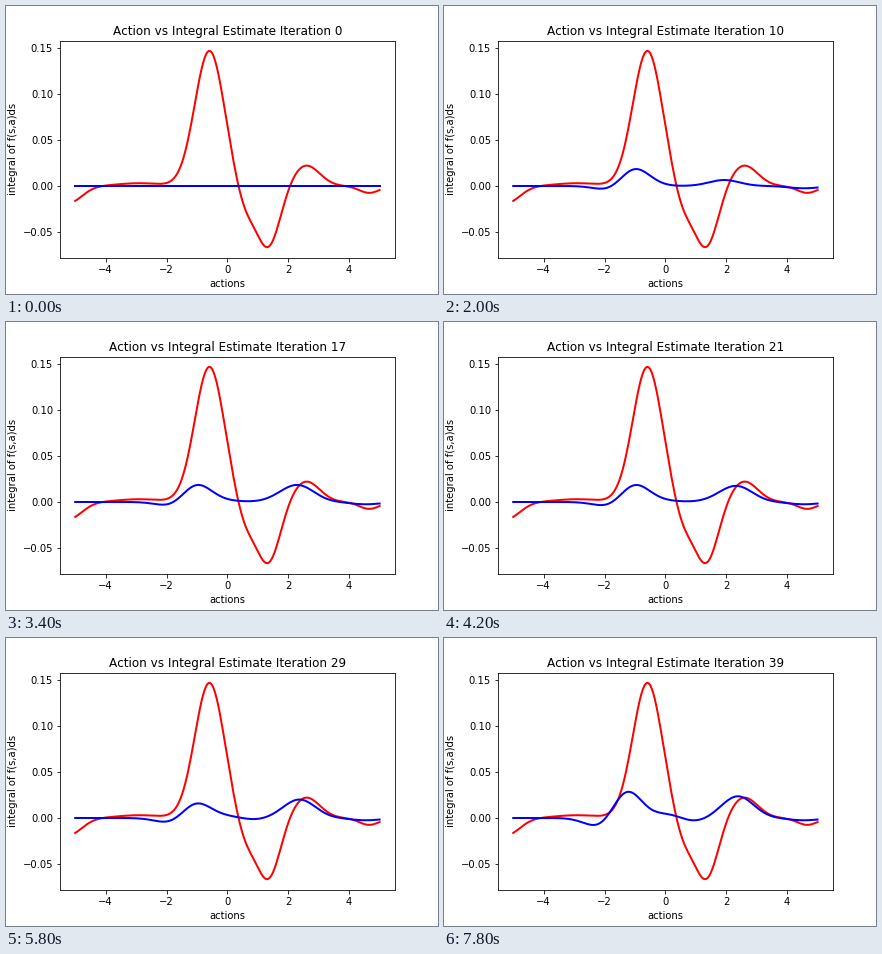
Animation, 432 px wide and 288 px high, one loop 8000 ms. Source, as a matplotlib script:

```python
import numpy as np
import matplotlib.pyplot as plt
from matplotlib.animation import FuncAnimation

FRAMES = 40
INTERVAL = 200

plt.rcParams["font.family"] = "DejaVu Sans"
plt.rcParams["text.kerning_factor"] = 6


def bump(x, centre, height, width=0.5):
    """Gaussian bump, height in thousandths."""
    return height / 1000 * np.exp(-((x - centre) ** 2) / (2 * width**2))


def truth(x):
    return (bump(x, -5.25, -19, 0.45) + bump(x, -2.9, 3, 0.7)
            + bump(x, -0.59, 147, 0.48)
            + bump(x, 0.58, -22, 0.3) + bump(x, 1.33, -66, 0.39)
            + bump(x, 2.58, 22.5, 0.45) + bump(x, 4.66, -7.5, 0.33))


# Kernels (centre, height) learned gradually up to the given iteration
STAGES = [
    (5, [(-1.05, 21.4), (1.93, 6.5)]),
    (10, [(-1.68, -7.5), (4.55, -2.5)]),
    (17, [(2.42, 14), (0.05, 1)]),
    (25, [(1.9, -2.8), (-2, -1)]),
    (33, [(-0.85, -5.5), (0.05, 2), (0.9, -4.4), (2.45, 7.2)]),
    (39, [(-2.1, -10), (-1.42, 25), (-0.8, -5), (0.05, 2.5)]),
]


def estimate(x, n):
    total = np.zeros_like(x)
    start = 0
    for end, kernels in STAGES:
        grown = np.clip((n - start) / (end - start), 0, 1)
        for centre, height in kernels:
            total += bump(x, centre, grown * height)
        start = end
    return total


actions = np.linspace(-5, 5, 201)

fig, ax = plt.subplots(figsize=(6, 4), dpi=72, facecolor="white")
fig.subplots_adjust(left=0.125, right=0.9, bottom=0.125, top=0.88)
ax.plot(actions, truth(actions), color="red", lw=2)
line, = ax.plot(actions, estimate(actions, 0), color="blue", lw=2)
ax.set_xlim(-5.5, 5.5)
ax.set_ylim(-0.0783, 0.1581)
ax.set_xticks(range(-4, 5, 2))
ax.set_yticks(np.arange(-1, 4) * 0.05)
ax.set_xlabel("actions")
ax.set_ylabel("integral of f(s,a)ds")
title = ax.set_title("")


def update(n):
    line.set_ydata(estimate(actions, n))
    title.set_text(f"Action vs Integral Estimate Iteration {n}")
    return line, title


anim = FuncAnimation(fig, update, frames=FRAMES, interval=INTERVAL,
                     repeat=True, repeat_delay=0, blit=False)
plt.show()
```
